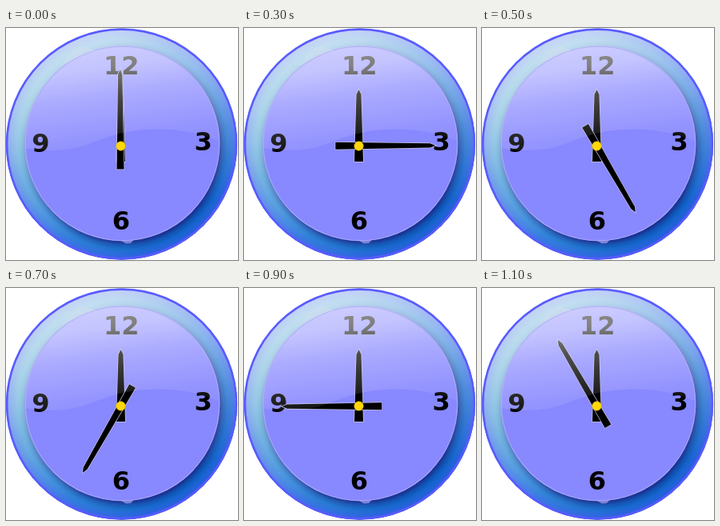
Animation of 290x290 px, one loop 1200 ms. Source, as an HTML page:

```html
<!DOCTYPE html>
<html lang="en">
<head>
<meta charset="utf-8">
<title>Clock</title>
<style>
html, body { margin: 0; width: 100%; height: 100%; overflow: hidden; background: #fff; }
svg { display: block; width: 290px; height: 290px; }
text { font: bold 32px "DejaVu Sans", Verdana, sans-serif; text-anchor: middle; }
.hands path { stroke: #c4c4ee; stroke-width: 1.4; paint-order: stroke; }
</style>
</head>
<body>
<svg viewBox="0 0 290 290">
  <defs>
    <linearGradient id="ring" gradientUnits="userSpaceOnUse" x1="45" y1="45" x2="245" y2="245">
      <stop offset="0" stop-color="#74bfd6"/>
      <stop offset=".5" stop-color="#3c8fdc"/>
      <stop offset="1" stop-color="#0a66c6"/>
    </linearGradient>
    <radialGradient id="rim" gradientUnits="userSpaceOnUse" cx="144.5" cy="145" r="145">
      <stop offset=".9" stop-color="#5454ff" stop-opacity="0"/>
      <stop offset=".975" stop-color="#5454ff" stop-opacity=".4"/>
      <stop offset="1" stop-color="#5454ff" stop-opacity=".8"/>
    </radialGradient>
    <linearGradient id="sheen" gradientUnits="userSpaceOnUse" x1="105" y1="5" x2="165" y2="240">
      <stop offset="0" stop-color="#f4f4ff" stop-opacity=".68"/>
      <stop offset=".3" stop-color="#f4f4ff" stop-opacity=".48"/>
      <stop offset=".65" stop-color="#f4f4ff" stop-opacity=".2"/>
      <stop offset="1" stop-color="#f4f4ff" stop-opacity="0"/>
    </linearGradient>
    <linearGradient id="gloss" gradientUnits="userSpaceOnUse" x1="134" y1="20" x2="154" y2="160">
      <stop offset="0" stop-color="#fff" stop-opacity=".58"/>
      <stop offset=".2" stop-color="#fff" stop-opacity=".5"/>
      <stop offset=".45" stop-color="#fff" stop-opacity=".29"/>
      <stop offset=".8" stop-color="#fff" stop-opacity=".11"/>
      <stop offset="1" stop-color="#fff" stop-opacity=".05"/>
    </linearGradient>
    <filter id="soft" x="-20%" y="-20%" width="140%" height="140%">
      <feGaussianBlur stdDeviation="4"/>
    </filter>
    <clipPath id="disc"><circle cx="144.5" cy="145" r="144.7"/></clipPath>
    <clipPath id="dial"><circle cx="145.5" cy="144.5" r="121.5"/></clipPath>
  </defs>

  <g clip-path="url(#disc)">
    <circle cx="144.5" cy="145" r="145" fill="url(#ring)"/>
    <circle cx="148" cy="148" r="122" fill="#1a1478" opacity=".85" filter="url(#soft)"/>
    <circle cx="144.5" cy="145" r="145" fill="url(#rim)"/>
    <circle cx="144.5" cy="145" r="145" fill="url(#sheen)"/>
    <circle cx="144.5" cy="145" r="143.4" fill="none" stroke="#5a5aff" stroke-width="2.6"/>
  </g>

  <circle cx="145.5" cy="144.5" r="121.5" fill="#8888ff"/>
  <path d="M144 266 L160 264.5 L156 269 L150 269.5 Z" fill="#7c84dc"/>

  <text x="144.3" y="58">12</text>
  <text x="246.7" y="153">3</text>
  <text x="144" y="252">6</text>
  <text x="43.5" y="155">9</text>

  <g class="hands">
    <path d="M138 167 H149 L146.5 83 L143.5 77 L140.5 83 Z"/>
    <path id="minute" d="M138.5 176.5 H147.5 L145.3 58 L142.7 51.5 L140 58 Z"/>
  </g>

  <g clip-path="url(#dial)">
    <path d="M20 150 C45 154 75 155 100 146 C130 135 150 127 188 126.5 C220 126 248 133 270 143 V20 H20 Z" fill="url(#gloss)"/>
  </g>
  <path d="M68 48 Q86 24 96 23 L114 28 Q90 34 68 48 Z" fill="#d4e0f2" opacity=".5"/>
  <circle cx="145.5" cy="144.5" r="121.3" fill="none" stroke="#b4b0fa" stroke-width="1.2" opacity=".8"/>
  <circle cx="143.5" cy="147.5" r="5.7" fill="#ffd80a" stroke="#e8b800" stroke-width=".6"/>
</svg>
<script>
const STEP = 100, STEPS = 12;
const minute = document.getElementById("minute");
const start = performance.now();

function draw(now) {
  const step = Math.floor(Math.max(0, now - start) / STEP) % STEPS;
  minute.setAttribute("transform", `rotate(${step * 360 / STEPS} 143.3 147.5)`);
  requestAnimationFrame(draw);
}
draw(start);
</script>
</body>
</html>
```
